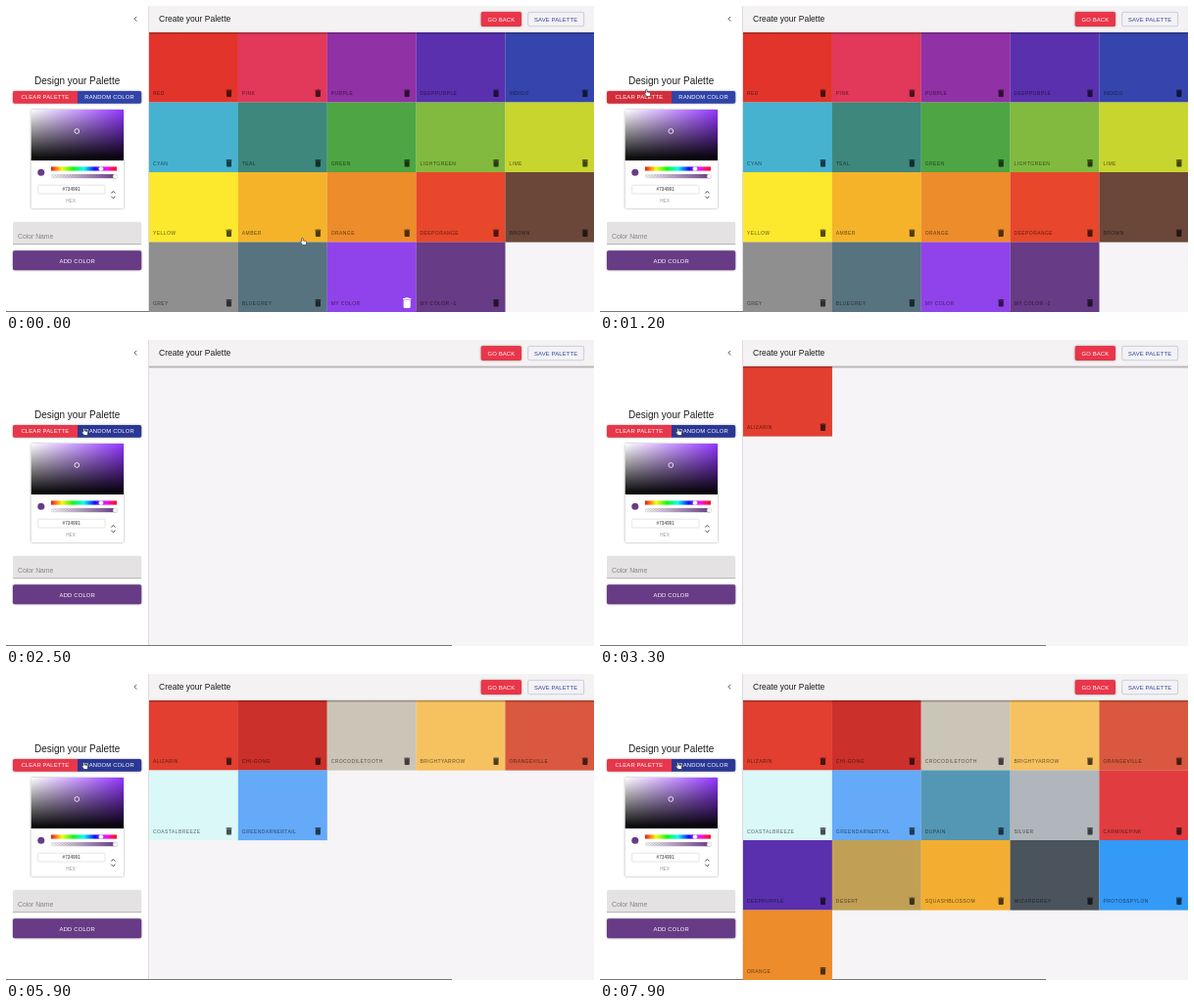
An HTML page that plays this animation: 600x313 px, repeating every 8 s.

```html
<!DOCTYPE html>
<html lang="en">
<head>
<meta charset="utf-8">
<title>Create your Palette</title>
<style>
html, body { margin: 0; width: 100%; height: 100%; overflow: hidden; background: #f6f4f6; }
svg { display: block; width: 100%; height: 100%; font-family: "Liberation Sans", Arial, sans-serif; }
.btn { font-size: 5.9px; letter-spacing: .15px; text-anchor: middle; fill: #fff; }
.tag { font-size: 5px; letter-spacing: .42px; fill: rgba(0, 0, 0, .6); }
.lift { filter: drop-shadow(0 .8px .8px rgba(0, 0, 0, .38)); }
</style>
</head>
<body>
<svg id="stage" viewBox="0 0 600 313" preserveAspectRatio="none">
  <defs>
    <linearGradient id="sat"><stop stop-color="#fff"/><stop offset="1" stop-color="#9236ff"/></linearGradient>
    <linearGradient id="dark" x2="0" y2="1"><stop stop-color="#000" stop-opacity="0"/><stop offset="1"/></linearGradient>
    <linearGradient id="hue"></linearGradient>
    <linearGradient id="alpha"><stop stop-color="#673b85" stop-opacity="0"/><stop offset="1" stop-color="#673b85"/></linearGradient>
    <linearGradient id="shade" x2="0" y2="1"><stop stop-opacity=".38"/><stop offset="1" stop-opacity="0"/></linearGradient>
    <pattern id="check" width="3" height="3" patternUnits="userSpaceOnUse">
      <path fill="#fff" d="M0 0h3v3H0z"/><path fill="#d4d4d4" d="M0 0h1.5v1.5H0zM1.5 1.5H3V3H1.5z"/>
    </pattern>
  </defs>
  <rect width="600" height="313" fill="#f6f4f6"/>
  <rect width="145" height="313" fill="#fff"/>
  <rect x="145" width="1" height="313" fill="#dedcde"/>
  <rect y="312" width="455" height="1" fill="#777"/>
  <g id="tiles"></g>

  <rect x="146" y="26.5" width="454" height="3" fill="url(#shade)"/>
  <rect x="146" width="454" height="26.5" fill="#f4f2f2"/>
  <text x="156" y="16" font-size="8.5" fill="#1c1c1c">Create your Palette</text>
  <rect class="lift" x="484.7" y="6" width="41.3" height="15" rx="1.7" fill="#e8364a"/>
  <text class="btn" x="505.4" y="15.7">GO BACK</text>
  <rect x="532.7" y="6.3" width="57" height="14.4" rx="1.7" fill="none" stroke="#aab2d9" stroke-width=".6"/>
  <text class="btn" x="561.2" y="15.7" style="fill:#3044a8">SAVE PALETTE</text>

  <path d="M133.3 10.9 131 13.2l2.3 2.3" fill="none" stroke="#555" stroke-width="1"/>
  <text x="72.6" y="80" font-size="10" text-anchor="middle" fill="#1c1c1c">Design your Palette</text>
  <g class="lift">
    <path id="clear" d="M73 87H8.7A1.7 1.7 0 0 0 7 88.700V98a1.700 1.700 0 0 0 1.700 1.700H73z"/>
    <path id="random" d="M73 87h63.500a1.700 1.700 0 0 1 1.700 1.700V98a1.700 1.700 0 0 1-1.700 1.700H73z"/>
  </g>
  <text class="btn" x="39.900" y="95.400">CLEAR PALETTE</text>
  <text class="btn" x="105.600" y="95.400">RANDOM COLOR</text>

  <rect class="lift" x="25.700" y="106" width="94.300" height="101" rx=".8" fill="#fff"/>
  <rect x="25.700" y="106" width="94.300" height="52" fill="url(#sat)"/>
  <rect x="25.700" y="106" width="94.300" height="52" fill="url(#dark)"/>
  <circle cx="72.300" cy="128" r="2.400" fill="none" stroke="#fff" stroke-width=".8"/>
  <circle cx="35.800" cy="170.200" r="3.500" fill="#673b85"/>
  <rect x="46" y="164.400" width="67" height="4.200" fill="url(#hue)"/>
  <rect x="46" y="172" width="67" height="4.200" fill="url(#check)"/>
  <rect x="46" y="172" width="67" height="4.200" fill="url(#alpha)"/>
  <g fill="#f8f8f8" stroke="#aaa" stroke-width=".3">
    <circle cx="97" cy="166.600" r="2.400"/><circle cx="111.500" cy="174.200" r="2.400"/>
  </g>
  <rect x="32.700" y="183.200" width="68.300" height="8.800" rx=".7" fill="#fff" stroke="#d5d5d5" stroke-width=".6"/>
  <text x="66.700" y="189.300" font-size="4.700" text-anchor="middle" fill="#333">#734991</text>
  <text x="66" y="201" font-size="4.600" text-anchor="middle" fill="#969696">HEX</text>
  <path d="M107.300 191.500l2-2 2 2M107.300 194.700l2 2 2-2" fill="none" stroke="#333" stroke-width=".9"/>

  <path d="M7 244v-21.500a1.700 1.700 0 0 1 1.700-1.700h127.800a1.700 1.700 0 0 1 1.700 1.700V244z" fill="#e4e2e3"/>
  <path d="M7 243.700h131.200" stroke="#929092" stroke-width=".6"/>
  <text x="12" y="237.800" font-size="6.800" fill="#868486">Color Name</text>
  <rect class="lift" x="7" y="250.300" width="131.200" height="20" rx="1.700" fill="#673b85"/>
  <text class="btn" x="72.800" y="262.500">ADD COLOR</text>
  <g id="cursor"><path/></g>
</svg>
<script>
const LOOP = 8000, STEP = 100, CLEARED = 1500, COL = 90.85, ROW = 71.5;
const TRASH = "M6 19c0 1.1.9 2 2 2h8c1.1 0 2-.9 2-2V7H6v12zM19 4h-3.5l-1-1h-5l-1 1H5v2h14V4z";
const START = `RED e3342b,PINK e23859,PURPLE 9031a6,DEEPPURPLE 5b30ae,INDIGO 3645ae,
CYAN 47b2d0,TEAL 3d877c,GREEN 4ea544,LIGHTGREEN 81ba3f,LIME c8d52f,
YELLOW fce82d,AMBER f5b32a,ORANGE ed8c2b,DEEPORANGE e8472b,BROWN 6b473a,
GREY 8f8f8f,BLUEGREY 577380,MY COLOR 9043ea,MY COLOR -1 673b85`;
const ADDED = `ALIZARIN e23f30,CHI-GONG cb302b,CROCODILETOOTH cbc5b7,BRIGHTYARROW f6c260,ORANGEVILLE d9583f,
COASTALBREEZE daf8f8,GREENDARNERTAIL 64aaf8,DUPAIN 5497b4,SILVER b0b6bb,CARMINEPINK e13d41,
DEEPPURPLE 5b30ae,DESERT c1a055,SQUASHBLOSSOM f3ae31,WIZARDGREY 4b535c,PROTOSSPYLON 339af7,
ORANGE ed8c2b`;
const CLICKS = [3100, 3600, 4000, 4400, 4900, 5300, 5700, 6000, 6200, 6400, 6500, 6700, 6800, 7000, 7100, 7300];
// time, x, y
const TRACK = [[0, 303, 241], [100, 303, 241], [700, 75, 78], [900, 75, 78], [1300, 43, 91],
  [1900, 43, 91], [2500, 80, 94], [LOOP, 80, 94]];
const CURSORS = {
  hand: ["M-1.4-3c.2-1 1.3-1 1.5 0l.2 2 2.600.600c.600.200.800.700.700 1.300L3.200 3.500H-.2L-2.500.7c-.4-.7.3-1.200.9-.8l.5.4z", "#fff", "#222"],
  beam: ["M-1.300-3Q0-3 0-2.200Q0-3 1.300-3M0-2.200V2.700M-1.300 3.400Q0 3.400 0 2.700Q0 3.400 1.300 3.400", "none", "#222"],
  arrow: ["M-1.500-3.500V3l1.500-1.400 1 2.400 1-.4-1-2.300h2z", "#111", "#fff"]
};

const $ = id => document.getElementById(id);

function add(parent, tag, attrs, text) {
  const el = document.createElementNS("http://www.w3.org/2000/svg", tag);
  for (const k in attrs) el.setAttribute(k, attrs[k]);
  if (text) el.textContent = text;
  return parent.appendChild(el);
}

function makeTile(entry, i) {
  const cut = entry.lastIndexOf(" ");
  const x = 146 + i % 5 * COL, y = 27 + Math.floor(i / 5) * ROW;
  const g = add($("tiles"), "g", { transform: `translate(${x} ${y})` });
  add(g, "rect", { width: COL + .1, height: ROW + .1, fill: "#" + entry.slice(cut + 1) });
  add(g, "text", { class: "tag", x: 4, y: 64 }, entry.slice(0, cut).trim());
  const icon = add(g, "path", { d: TRASH });
  setIcon(icon, 0);
  return { g, icon };
}

// h runs from 0 (idle) to 1 (hovered)
function setIcon(icon, h) {
  const c = Math.round(255 * h);
  icon.setAttribute("transform", `translate(81.5 62.2) scale(${.425 * (1 + .4 * h)}) translate(-12 -12)`);
  icon.setAttribute("fill", `rgba(${c},${c},${c},${.68 + .32 * h})`);
}

const ease = p => p * p * (3 - 2 * p);

function cursorAt(t) {
  const i = TRACK.findIndex(k => k[0] > t);
  const [t0, x0, y0] = TRACK[i - 1], [t1, x1, y1] = TRACK[i];
  const p = ease((t - t0) / (t1 - t0));
  return [x0 + (x1 - x0) * p, y0 + (y1 - y0) * p];
}

function cursorKind(x, y) {
  if (x > 146 || (y > 87 && y < 100)) return "hand";
  return x > 29 && x < 117 && y > 70 && y < 84 ? "beam" : "arrow";
}

for (let i = 0; i < 7; i++) add($("hue"), "stop", { offset: i / 6, "stop-color": `hsl(${i * 60} 95% 52%)` });
const first = START.split(",").map(makeTile);
const later = ADDED.split(",").map(makeTile);
const show = (el, on) => el.setAttribute("visibility", on ? "visible" : "hidden");

function draw(ms) {
  const t = Math.floor(ms % LOOP / STEP) * STEP;
  first.forEach(tile => show(tile.g, t < CLEARED));
  later.forEach((tile, i) => show(tile.g, t >= CLICKS[i]));
  setIcon(first[17].icon, 1 - ease(Math.min(1, Math.max(0, (t - 100) / 300))));

  const [x, y] = cursorAt(t), over = y > 87 && y < 100 && x < 138;
  $("clear").setAttribute("fill", over && x < 73 ? "#d32d3c" : "#e8364a");
  $("random").setAttribute("fill", over && x >= 73 ? "#2a3794" : "#3044a8");

  const [d, fill, stroke] = CURSORS[cursorKind(x, y)];
  const shape = $("cursor").firstElementChild;
  shape.setAttribute("d", d);
  shape.setAttribute("fill", fill);
  shape.setAttribute("stroke", stroke);
  shape.setAttribute("stroke-width", .6);
  $("cursor").setAttribute("transform", `translate(${x} ${y})`);
}

const begin = performance.now();
function tick() {
  draw(performance.now() - begin);
  requestAnimationFrame(tick);
}
tick();
</script>
</body>
</html>
```
